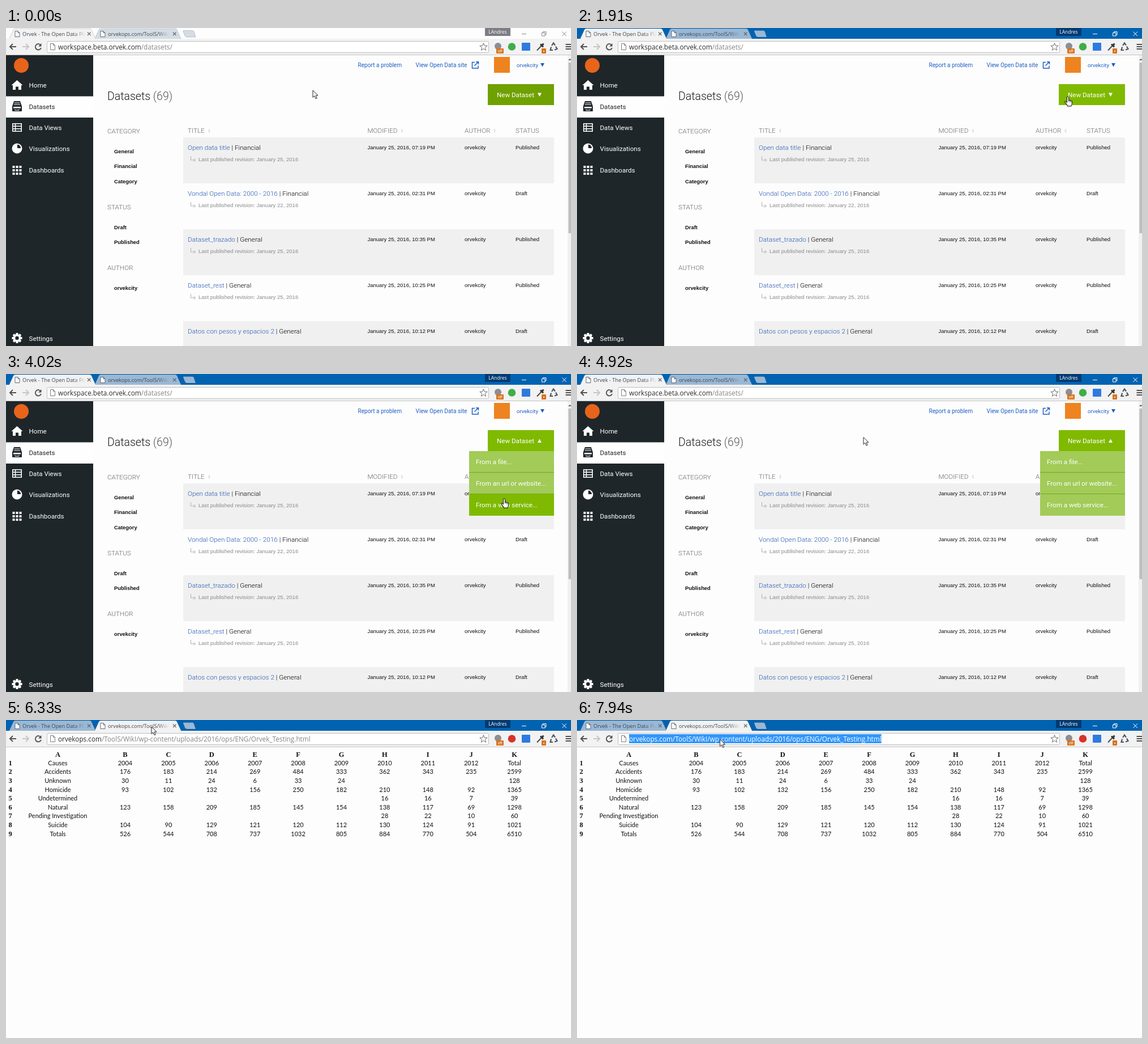
Animation, 998 px wide and 561 px high, one loop 8000 ms. Source, as an HTML page:

```html
<!DOCTYPE html>
<html lang="en">
<head>
<meta charset="utf-8">
<title>Datasets</title>
<style>
  html, body { margin: 0; width: 100%; height: 100%; overflow: hidden; background: #fdfdfd; }
  svg { display: block; width: 998px; height: 561px; }
  text { white-space: pre; }
  .ui { font-family: "Open Sans", "Noto Sans", sans-serif; }
  .rb { font-family: Roboto, sans-serif; }
  .lt { font-family: Roboto, sans-serif; font-weight: 300; }
  .ar { font-family: "Liberation Sans", Arial, sans-serif; }
  .cell { font-family: Lato, sans-serif; }
  .head { font-family: "Liberation Serif", serif; font-weight: 700; }
</style>
</head>
<body>
<svg id="stage" viewBox="0 0 998 561" xmlns="http://www.w3.org/2000/svg"></svg>
<script>
const LOOP = 8000;
const FOCUS = 1810, HOVER = 1350, OPEN = 2050, SWITCH = 5430, SELECT = 7440;
const LINK = '#2257b3';

const rect = (x, y, w, h, fill, more = '') =>
  `<rect x="${x}" y="${y}" width="${w}" height="${h}" fill="${fill}" ${more}/>`;
const path = (d, fill, stroke = 'none', width = 1, more = '') =>
  `<path d="${d}" fill="${fill}" stroke="${stroke}" stroke-width="${width}" ${more}/>`;
const line = (d, stroke, width = 1, more = '') => path(d, 'none', stroke, width, more);
const text = (x, y, str, size, fill, cls = 'rb', more = '') =>
  `<text x="${x}" y="${y}" class="${cls}" font-size="${size}" fill="${fill}" ${more}>${str}</text>`;
const group = (id, body) => `<g id="${id}">${body}</g>`;
const span = (fill, str) => `<tspan fill="${fill}">${str}</tspan>`;

// ---- browser frame ----
const sheet = (x, y, w, h, stroke) =>
  path(`M${x} ${y}h${w - 3}l3 3v${h - 3}h${-w}z M${x + w - 3} ${y}v3h3`, '#fff', stroke);

function tab(x, label, fill, fade, ink) {
  return path(`M${x} 19.5L${x + 7.5} 3Q${x + 8.5} 1 ${x + 11} 1H${x + 142}Q${x + 144.5} 1 ${x + 145.5} 3L${x + 153} 19.5z`,
      fill, 'rgba(60,80,100,.3)', .7) +
    sheet(x + 10.5, 5.5, 8, 10, ink) +
    text(x + 23.5, 13.5, label, 9.2, `url(#${fade})`, 'ui') +
    line(`M${x + 138.5} 7.5l5.5 5.5m0 -5.5l-5.5 5.5`, ink, 1.2);
}

function strip(active, focused) {
  const idle = focused ? '#9ab8d5' : '#d5dde4';
  const ctl = focused ? '#fff' : '#8a8a8a';
  const fill = i => i === active ? '#f2f2f2' : idle;
  const first = tab(5.5, 'Orvek - The Open Data Platform', fill(0), 'fadeA', '#5f6a74');
  const second = tab(156.5, 'orvekops.com/ToolS/WikI/wp-content', fill(1), 'fadeB', '#5f6a74');
  return rect(0, 0, 998, 19, focused ? '#0063b1' : '#fdfdfd') +
    path('M314 4.5h15q2 0 3 2l3 9.5h-15q-3 0 -4 -2.5l-3 -7.5q-.8 -1.5 1 -1.5z', idle, 'rgba(60,80,100,.4)', .7) +
    (active ? first + second : second + first) +
    rect(846, 0, 45, 14, focused ? '#003a73' : '#7d7d86') +
    text(868.5, 10, 'LAndres', 8.5, '#fff', 'ui', 'text-anchor="middle"') +
    line('M911 10.5h8M946.5 8.5h5.5v5.5h-5.5zM948.5 8.5v-2h5.5v5.5h-2M982.5 6.5l7.5 7.5m0 -7.5l-7.5 7.5', ctl);
}

function toolbar() {
  const star = Array.from({ length: 10 }, (_, i) => {
    const a = i * Math.PI / 5 - Math.PI / 2, r = i % 2 ? 3 : 7;
    return (843.5 + r * Math.cos(a)).toFixed(1) + ' ' + (33.5 + r * Math.sin(a)).toFixed(1);
  }).join('L');
  const badge = (x, w, str) => rect(x, 36, w, 9, '#d9731a', 'rx="1"') +
    text(x + w / 2, 43, str, 7, '#fff', 'ar', 'text-anchor="middle"');
  return rect(0, 19, 998, 29, '#f2f2f2') + rect(0, 47, 998, 1, '#c4c4c4') +
    line('M18 33H8M12 28l-5 5l5 5', '#505050', 2) +
    line('M29 33h10M35 28l5 5l-5 5', '#c6c6c6', 2) +
    line('M61.5 30.5A5.2 5.2 0 1 0 62 35', '#505050', 1.9) + path('M62.5 27v5.5h-5.5z', '#505050') +
    rect(72.5, 23.5, 780, 20, '#fff', 'rx="2" stroke="#bdbdbd"') +
    sheet(78.5, 27.5, 8, 11, '#7d7d7d') +
    path('M' + star + 'z', '#fff', '#6b6b6b') +
    '<circle cx="869" cy="32" r="6" fill="#8d8d92"/>' + badge(866, 13, 'off') +
    rect(911, 26, 15, 14, '#2d7be0', 'rx="1"') +
    line('M938 39.5l7.5 -8', '#4a4a4a', 2) + line('M944 28.5l5 5M946.5 31l3 -3.5', '#333', 3) +
    badge(946, 8, '•') +
    line('M964 31l3 -4.5l3 4M971 32.5l2.5 4.5l-4.5 1.5M966 39h-4.5l1.5 -5.5', '#4d5560', 2.2) +
    line('M988.5 29h10M988.5 33h10M988.5 37h10', '#505050', 2);
}

const url = (host, rest, a = '#2a2a2a', b = '#858585', id = '') =>
  text(92, 37.5, span(a, host) + span(b, rest), 11.75, a, 'ui', id && `id="${id}"`);
const DEEP = ['orvekops.com', '/ToolS/WikI/wp-content/uploads/2016/ops/ENG/Orvek_Testing.html'];
const dot = fill => `<circle cx="893.5" cy="33" r="6.8" fill="${fill}"/>`;

// ---- datasets page ----
function sidebar() {
  const W = '#fff', D = '#1f262a';
  const items = [['Home', 105], ['Datasets', 142.5], ['Data Views', 180], ['Visualizations', 217], ['Dashboards', 255], ['Settings', 552]];
  let out = rect(0, 48, 154, 513, D) + rect(0, 120.5, 154, 37.5, '#fefefe') +
    '<circle cx="27" cy="66" r="13" fill="#e8641b"/>';
  for (const [name, y] of items)
    out += text(40.5, y, name, 11.6, name === 'Datasets' ? '#222' : W);
  out += path('M19.5 92l10 9h-2.5v8h-5v-5.5h-5v5.5h-5v-8h-2.5z', W);
  out += path('M14 129h11l3 9v8q0 1 -1 1h-15q-1 0 -1 -1v-8z', D) +
    line('M14.5 132h10M14 135h11', W, 1) + path('M13 139h13v2.5h-13z', W) + line('M16 143.5v1.5h7v-1.5', W);
  out += line('M11.8 168.8h15.4v13.4H11.8zM12 173.3h15M12 177.8h15M16.5 169v13', W, 1.6);
  out += '<circle cx="19.5" cy="212.5" r="9" fill="#fff"/>' + path('M20 212V205.5A6.5 6.5 0 0 1 26 212z', D);
  for (let i = 0; i < 9; i++) out += rect(11.5 + i % 3 * 6, 243 + Math.floor(i / 3) * 6, 4, 4, W);
  for (let i = 0; i < 4; i++) out += rect(17.5, 538, 4, 18, W, `transform="rotate(${i * 45} 19.5 547)"`);
  out += `<circle cx="19.5" cy="547" r="7" fill="${W}"/><circle cx="19.5" cy="547" r="3.2" fill="${D}"/>`;
  return out;
}

function filters() {
  const label = (y, s) => text(179, y, s, 11.7, '#666', 'lt');
  const item = (y, s) => text(191, y, s, 9.4, '#111', 'ar', 'font-weight="700"');
  return label(185.5, 'CATEGORY') + item(220.5, 'General') + item(247, 'Financial') + item(273.5, 'Category') +
    label(319.5, 'STATUS') + item(354.5, 'Draft') + item(381, 'Published') +
    label(427, 'AUTHOR') + item(462, 'orvekcity');
}

function listing() {
  const rows = [
    ['Open data title', 'Financial', '25', '07:19', 'Published'],
    ['Vondal Open Data: 2000 - 2016', 'Financial', '22', '02:31', 'Draft'],
    ['Dataset_trazado', 'General', '25', '10:35', 'Published'],
    ['Dataset_rest', 'General', '25', '10:25', 'Published'],
    ['Datos con pesos y espacios 2', 'General', '', '10:12', 'Draft']
  ];
  const sort = x => path(`M${x} 180.5l2 -2.5l2 2.5zM${x} 182l2 2.5l2 -2.5z`, '#d2d2d2');
  let out = sort(357) + sort(697.5) + sort(861);
  for (const [x, s] of [[321, 'TITLE'], [638.5, 'MODIFIED'], [810, 'AUTHOR'], [900, 'STATUS']])
    out += text(x, 185, s, 11.7, '#666', 'lt');
  rows.forEach(([title, kind, day, time, status], i) => {
    const y = 193 + i * 81;
    if (i % 2 === 0) out += rect(313, y, 655, 81, '#f0f0f0');
    out += text(321, y + 22, span(LINK, title) + ' | ' + kind, 11.75, '#000', 'lt') +
      text(638.5, y + 20.5, `January 25, 2016, ${time} PM`, 9.5, '#111', 'ar') +
      text(810, y + 20.5, 'orvekcity', 9.5, '#111', 'ar') +
      text(900, y + 20.5, status, 9.6, '#111', 'ar');
    if (day)
      out += line(`M326.5 ${y + 33}v7h8M331.5 ${y + 37}l3 3l-3 3`, '#b0b0b0') +
        text(340, y + 42, `Last published revision: January ${day}, 2016`, 9.55, '#8a8a8a', 'ar');
  });
  return out;
}

function menu() {
  const names = ['From a file...', 'From an url or website...', 'From a web service...'];
  return names.map((s, i) => {
    const y = 136 + i * 38;
    return rect(818, y, 150, 38, '#a2cb58') + group('item' + i, rect(818, y, 150, 38, '#7fba00')) +
      (i ? rect(818, y - 1, 150, 1, '#76a524') : '') + text(830, y + 22.5, s, 11.6, '#fff');
  }).join('');
}

function datasets() {
  return rect(0, 48, 998, 513, '#fdfdfd') + sidebar() +
    text(179, 127, 'Datasets ' + span('#555', '(69)'), 19.5, '#1a1a1a', 'lt') +
    text(621.5, 69, 'Report a problem', 10.1, '#1f5fc4') +
    text(723.5, 69, 'View Open Data site', 10.2, '#1f5fc4') +
    line('M828 60.5h-4.5v10.5h10.5v-4.5M830 59.8h4.5v4.5M834 60l-6.5 6.5', '#1f5fc4', 1.5) +
    rect(862, 51, 28, 28, '#ee8420') +
    text(902, 69, 'orvekcity', 9.5, '#1f5fc4') + path('M944 62h7l-3.5 6.5z', '#1f5fc4') +
    filters() + listing() +
    rect(992, 48, 6, 513, '#f1f1f1') + rect(993.5, 61, 4.5, 301, '#bdbdbd') +
    path('M993 57l3 -3l3 3z', '#666') +
    rect(851, 99, 117, 37, '#6fa100') + group('lit', rect(851, 99, 117, 37, '#7fba00')) +
    text(867, 121.5, 'New Dataset', 11.6, '#fff') +
    group('down', path('M939 114.5h7l-3.5 6.5z', '#fff')) +
    group('menu', path('M939 121h7l-3.5 -6.5z', '#fff') + menu());
}

// ---- table page ----
function table() {
  const rows = [
    'Causes,2004,2005,2006,2007,2008,2009,2010,2011,2012,Total',
    'Accidents,176,183,214,269,484,333,362,343,235,2599',
    'Unknown,30,11,24,6,33,24,,,,128',
    'Homicide,93,102,132,156,250,182,210,148,92,1365',
    'Undetermined,,,,,,,16,16,7,39',
    'Natural,123,158,209,185,145,154,138,117,69,1298',
    'Pending Investigation,,,,,,,28,22,10,60',
    'Suicide,104,90,129,121,120,112,130,124,91,1021',
    'Totals,526,544,708,737,1032,805,884,770,504,6510'
  ];
  const mid = 'text-anchor="middle"';
  const col = i => i ? 210.5 + (i - 1) * 76.4 : 91.5;
  let out = rect(0, 48, 998, 513, '#fdfdfd');
  [...'ABCDEFGHIJK'].forEach((c, i) => out += text(col(i), 65, c, 12.5, '#111', 'head', mid));
  rows.forEach((row, r) => {
    const y = 79.8 + r * 15.6;
    out += text(7.5, y, r + 1, 12.5, '#111', 'head', mid);
    row.split(',').forEach((v, i) => { if (v) out += text(col(i), y, v, 11, '#111', 'cell', mid); });
  });
  return out;
}

const fade = (id, x) => `<linearGradient id="${id}" gradientUnits="userSpaceOnUse" x1="${x}" x2="${x + 22}" y1="0" y2="0">
  <stop stop-color="#3c444c"/><stop offset="1" stop-color="#3c444c" stop-opacity="0"/></linearGradient>`;

const pointer = group('arrow', path('M0 0v12.5l3 -2.7l2.1 4.9l2.1 -.9l-2.1 -4.8h4z', '#fff', '#222', 1)) +
  group('hand', path('M-1.5 1.2q0 -1.5 1.5 -1.5t1.5 1.5v4.5l4.8 1.2q1.5 .5 1.4 2l-.7 4.5l-1.2 3h-6.3l-1 -2.5l-3.7 -4.2q-.6 -1.8 1.3 -1.7l2.4 1.6z', '#fff', '#222', 1.1) +
    line('M1.5 6v2.8M3.9 7v2.5M6 7.8v2', '#222', .8)) +
  group('beam', line('M-3 -6h2.3l.7 .7l.7 -.7h2.3M0 -5.5v11M-3 6h2.3l.7 -.7l.7 .7h2.3', '#222', 1.1));

document.getElementById('stage').innerHTML =
  `<defs>${fade('fadeA', 119)}${fade('fadeB', 267)}</defs>` +
  rect(0, 0, 998, 561, '#fdfdfd') +
  group('blurred', strip(0, false)) + group('focused', strip(0, true)) + group('swapped', strip(1, true)) +
  toolbar() +
  group('list', datasets() + url('workspace.beta.orvek.com', '/datasets/') + dot('#3fae49')) +
  group('grid', table() + url(...DEEP) + dot('#d8322b')) +
  group('picked', rect(92, 25, 446, 16, '#3296fb', 'id="mark"') + url(...DEEP, '#fff', '#fff', 'marked')) +
  group('cursor', pointer);

const el = id => document.getElementById(id);
el('mark').setAttribute('width', el('marked').getComputedTextLength());

// ---- motion ----
const play = (id, frames) => el(id).animate(frames, { duration: LOOP, iterations: Infinity });

// Visible only between the given times.
function show(id, ...spans) {
  const frames = [{ offset: 0, opacity: 0, easing: 'step-end' }];
  for (const [from, to] of spans) {
    if (from === 0) frames[0].opacity = 1;
    else frames.push({ offset: from / LOOP, opacity: 1, easing: 'step-end' });
    if (to < LOOP) frames.push({ offset: to / LOOP, opacity: 0, easing: 'step-end' });
  }
  frames.push({ offset: 1, opacity: frames[frames.length - 1].opacity });
  play(id, frames);
}

show('blurred', [0, FOCUS]);
show('focused', [FOCUS, SWITCH]);
show('swapped', [SWITCH, LOOP]);
show('list', [0, SWITCH]);
show('grid', [SWITCH, LOOP]);
show('lit', [HOVER, SWITCH]);
show('down', [0, OPEN]);
show('menu', [OPEN, SWITCH]);
show('item0', [2380, 2680]);
show('item1', [2680, 3650]);
show('item2', [3650, 4500]);
show('picked', [SELECT, LOOP]);
show('hand', [HOVER, 4510]);
show('beam', [6760, 7700]);
show('arrow', [0, HOVER], [4510, 6760], [7700, LOOP]);

const moves = [
  [0, 542, 110], [150, 542, 110, 'ease-in-out'], [1550, 867, 121.5], [2150, 867, 121.5, 'ease-in-out'],
  [2900, 871, 185.5], [3420, 871, 185.5, 'ease-in-out'], [3850, 880, 220], [4420, 880, 220, 'ease-in'],
  [4720, 666, 145], [4830, 561, 127], [4920, 507, 112, 'ease-out'], [5330, 257, 12],
  [6550, 257, 12, 'ease-in-out'], [6950, 257, 39], [7600, 257, 39], [7700, 252.5, 34], [LOOP, 252.5, 34]
];
play('cursor', moves.map(([t, x, y, easing = 'linear']) =>
  ({ offset: t / LOOP, transform: `translate(${x}px, ${y}px)`, easing })));
</script>
</body>
</html>
```
